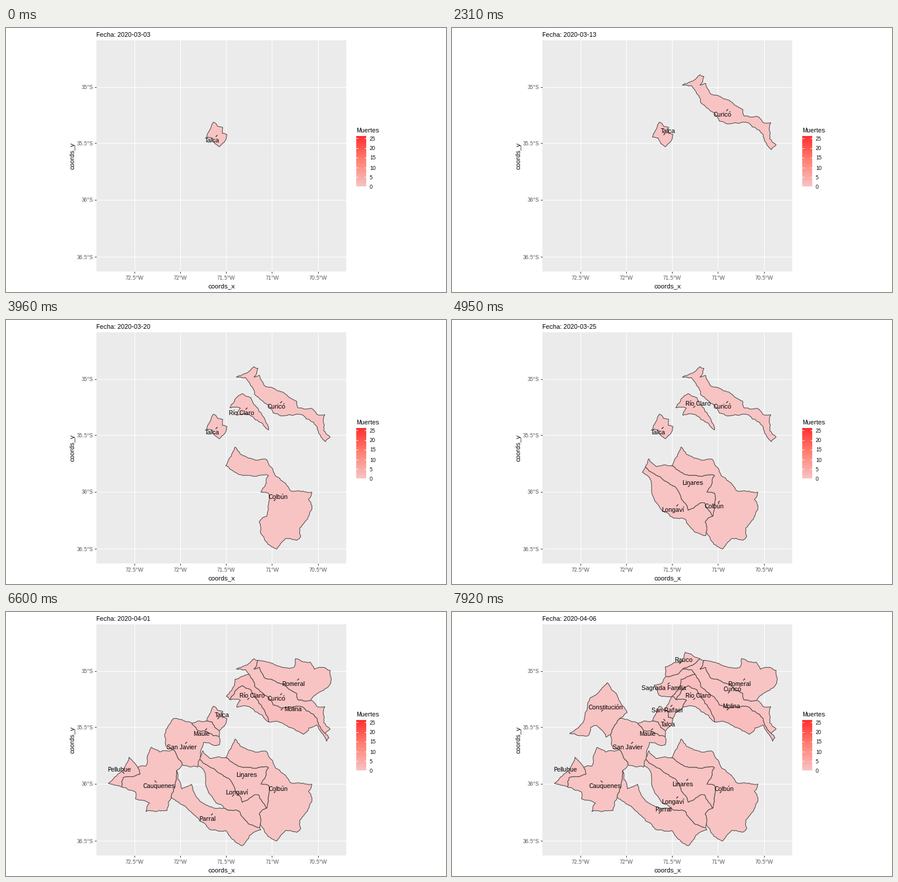
Write a matplotlib script that moves like this. It is 750x450 px and loops after 8 s.

```python
import math
import matplotlib.pyplot as plt
from matplotlib.animation import FuncAnimation
from matplotlib.colors import LinearSegmentedColormap
from matplotlib.patches import Polygon, Rectangle

W, H, DPI = 750, 450, 100
PX = 72 / DPI
LOOP, TICK, STEP = 8000, 40, 330
LOW, MID, HIGH = "#f8c3c3", "#ff8375", "#ff3030"

# Where a label may sit relative to its region's centre
SIDES = {"ne": (8, -7), "sw": (-9, 9), "se": (8, 9), "nw": (-8, -7), "e": (21, -2)}

plt.rcParams.update({
    "font.family": "Liberation Sans",
    "text.hinting": "native",
    "text.hinting_factor": 1,
})

fig = plt.figure(figsize=(W / DPI, H / DPI), dpi=DPI, facecolor="white")
ax = fig.add_axes([0, 0, 1, 1])
ax.axis("off")


def text(x, y, s, size=11, color="black", **kw):
    return ax.text(x, y, s, fontsize=size * PX, color=color, zorder=6, **kw)


def line(xs, ys, color, z=2):
    return ax.plot(xs, ys, color=color, lw=PX, solid_capstyle="butt", zorder=z)[0]


# Panel, graticule and axes
ax.add_patch(Rectangle((154, 21), 426, 394, fc="#ebebeb", ec="none", zorder=1))
for i in range(5):
    x = 218.5 + 78.25 * i
    line([x, x], [21, 415], "white")
    line([x, x], [415, 418], "#333333")
    text(x + 0.5, 429, f"{72.5 - i / 2:g}°W", 9, "#4d4d4d", ha="center")
for i, y in enumerate((100.5, 195.5, 292.5, 389.5)):
    line([154, 580], [y, y], "white")
    line([151, 154], [y, y], "#333333")
    text(149, y + 4, f"{35 + i / 2:g}°S", 9, "#4d4d4d", ha="right")
text(367, 443, "coords_x", ha="center")
text(118, 218, "coords_y", rotation=90, ha="right", va="center")
title = text(154, 15, "")

# Colour bar
ramp = LinearSegmentedColormap.from_list("ramp", [LOW, MID, HIGH])
ax.imshow([[1 - i / 85] for i in range(86)], cmap=ramp, aspect="auto",
          extent=(597, 614, 270, 184), zorder=2)
text(597, 178, "Muertes")
for v in range(0, 26, 5):
    y = round(269.5 - v * 3.29) + 0.5
    line([597, 600], [y, y], "white", 3)
    line([611, 614], [y, y], "white", 3)
    text(620, y + 4, str(v), 9)


def split(a, b):
    """Midpoint displacement; the shift depends on place only, so borders agree."""
    size = math.dist(a, b)
    if size < 4:
        return [a]
    x, y = (a[0] + b[0]) / 2, (a[1] + b[1]) / 2
    amp = min(0.1 * size, 2)
    mid = (x + amp * math.sin(12.9 * x + 7.2 * y),
           y + amp * math.cos(9.3 * x + 11.1 * y))
    return split(a, mid) + split(mid, b)


def rough(pts):
    edges = zip(pts, pts[1:] + pts[:1])
    return [(x + 0.5, y + 0.5) for a, b in edges for x, y in split(a, b)]


regions = []


def region(name, start, centre, pts, sides, fill=LOW):
    """sides: step -> side of the centre that the label takes from then on."""
    shape = ax.add_patch(Polygon(rough(pts), closed=True, fc=fill, ec="#444444",
                                 lw=PX, zorder=4))
    pin = line([0, 0], [0, 0], "black", 5)
    label = text(0, 0, name, ha="center")
    regions.append((start, centre, sides, shape, pin, label))


# Shared borders
talca_maule = [(341, 185), (351, 187), (363, 202)]
talca_rafael = [(360, 167), (369, 169), (368, 179), (376, 181)]
curico_low = [(414, 106), (423, 126), (440, 141), (455, 158), (468, 163),
              (500, 160), (524, 174), (544, 207)]
curico_top = [(429, 82), (422, 97), (432, 94), (442, 113), (470, 122),
              (495, 138), (497, 149), (519, 150)]
curico_left = [(414, 106), (408, 98), (392, 97)]
curico_rauco = [(392, 97), (410, 90), (422, 79)]
claro_molina = [(381, 149), (402, 125), (417, 132), (437, 163), (447, 187)]
claro_rafael = [(381, 149), (399, 150), (393, 162)]
molina_familia = [(375, 143), (389, 124), (390, 114), (414, 106)]
rauco_familia = [(392, 97), (378, 107), (364, 109)]
colbun_linares = [(374, 248), (397, 263), (447, 265), (434, 293), (447, 295),
                  (444, 334)]
colbun_longavi = [(444, 334), (431, 344), (433, 360)]
linares_longavi = [(444, 334), (430, 311), (402, 324), (379, 283), (362, 274),
                   (329, 250)]
longavi_parral = [(371, 334), (397, 339), (412, 360), (432, 367)]
cauq_pelluhue = [(224, 264), (228, 276), (199, 282), (197, 298)]
cauq_parral = [(290, 270), (285, 306), (281, 315)]
cauq_javier = [(287, 236), (300, 260)]
maule_javier = [(316, 189), (327, 202), (363, 212)]
const_javier = [(285, 181), (270, 208)]

region("Talca", 0, (360, 182),
       talca_maule + [(374, 190)] + talca_rafael[::-1] + [(353, 160)],
       {0: "sw", 3: "ne", 4: "sw", 7: "ne", 9: "sw", 18: "ne", 22: "se"})
region("Curicó", 6, (470, 138),
       curico_low + [(552, 199), (541, 188), (543, 161), (529, 160)]
       + curico_top[::-1] + curico_rauco[::-1] + curico_left[::-1],
       {6: "ne", 7: "sw", 10: "ne", 11: "sw", 17: "ne", 20: "sw", 22: "ne"})
region("Colbún", 11, (456, 308),
       [(390, 216), (400, 229), (418, 236), (443, 237), (458, 264), (484, 290),
        (521, 293), (515, 305), (521, 316), (516, 333), (500, 355), (502, 368),
        (495, 375), (476, 372), (461, 390), (446, 382)]
       + colbun_longavi[::-1] + colbun_linares[::-1],
       {11: "ne", 13: "sw", 17: "ne", 18: "sw", 20: "ne"})
region("Río Claro", 12, (411, 149),
       claro_molina + [(436, 175), (410, 160)] + claro_rafael[::-1],
       {12: "sw", 15: "ne", 18: "sw", 20: "ne"})
region("Linares", 13, (402, 284),
       colbun_linares + linares_longavi + [(335, 236), (347, 249)],
       {13: "ne", 18: "sw", 20: "ne", 22: "sw"})
region("Longaví", 14, (385, 314),
       linares_longavi[::-1] + colbun_longavi + longavi_parral[::-1]
       + [(345, 308), (335, 267), (324, 259)],
       {14: "ne", 15: "sw", 16: "ne", 18: "sw", 20: "ne", 22: "sw"})
region("Romeral", 16, (499, 113),
       curico_top + [(525, 142), (553, 121), (552, 99), (537, 94), (525, 97),
                     (518, 85), (493, 79), (490, 94), (468, 93)],
       {16: "ne", 20: "sw"})
region("Maule", 17, (342, 198), talca_maule + maule_javier[::-1], {17: "sw"})
region("Pelluhue", 18, (201, 275),
       cauq_pelluhue + [(174, 292), (198, 270), (209, 247)], {18: "nw"})
region("Cauquenes", 18, (253, 287),
       [(247, 230), (261, 238), (284, 234)] + cauq_javier + cauq_parral
       + [(274, 338), (238, 340), (244, 325), (220, 318), (220, 306)]
       + cauq_pelluhue[::-1] + [(238, 262)], {18: "se"})
region("Parral", 18, (352, 343),
       cauq_parral[::-1] + [(299, 301), (316, 293), (328, 319), (352, 333)]
       + longavi_parral
       + [(434, 371), (415, 380), (402, 398), (388, 388), (374, 372),
          (350, 371), (312, 338)],
       {18: "ne", 20: "sw", 22: "ne"})
region("Molina", 19, (468, 167),
       molina_familia + curico_low
       + [(550, 214), (546, 220), (529, 192), (516, 197), (506, 208),
          (478, 193), (465, 187)] + claro_molina[::-1],
       {19: "e", 22: "ne"}, "#fabdbd")
region("San Javier", 20, (308, 221),
       const_javier + [(274, 232)] + cauq_javier
       + [(326, 264), (336, 222), (363, 226)] + maule_javier[::-1], {20: "sw"})
region("San Rafael", 21, (375, 158),
       [(375, 143)] + claro_rafael + [(380, 172)] + talca_rafael[::-1],
       {21: "sw"})
region("Constitución", 22, (254, 169),
       [(200, 207), (223, 188), (236, 145), (264, 120), (287, 155), (298, 171)]
       + const_javier + [(262, 213), (246, 193), (236, 196), (232, 210)],
       {22: "ne"})
region("Sagrada Familia", 23, (370, 120),
       molina_familia + curico_left + rauco_familia
       + [(357, 121), (344, 124), (352, 141)], {23: "sw"})
region("Rauco", 24, (387, 88),
       curico_rauco + [(407, 71), (397, 68), (392, 84), (371, 90), (363, 93)]
       + rauco_familia[::-1], {24: "ne"})

ax.set_xlim(0, W)
ax.set_ylim(H, 0)


def update(i):
    step = (i * TICK + TICK - 10) // STEP
    day = int(3.42 + 1.44 * step)
    month, day = (3, day) if day <= 31 else (4, day - 31)
    title.set_text(f"Fecha: 2020-{month:02d}-{day:02d}")
    for start, (cx, cy), sides, *parts in regions:
        for art in parts:
            art.set_visible(step >= start)
        if step < start:
            continue
        dx, dy = SIDES[sides[max(k for k in sides if k <= step)]]
        _, pin, label = parts
        label.set_position((cx + dx, cy + dy + 4))
        pin.set_data([cx + 0.5, cx + 0.5 + math.copysign(3, dx)],
                     [cy + 0.5, cy + 0.5 + math.copysign(3, dy)])
    return [title] + [art for r in regions for art in r[3:]]


anim = FuncAnimation(fig, update, frames=LOOP // TICK, interval=TICK,
                     repeat=True, repeat_delay=0)
plt.show()
```
